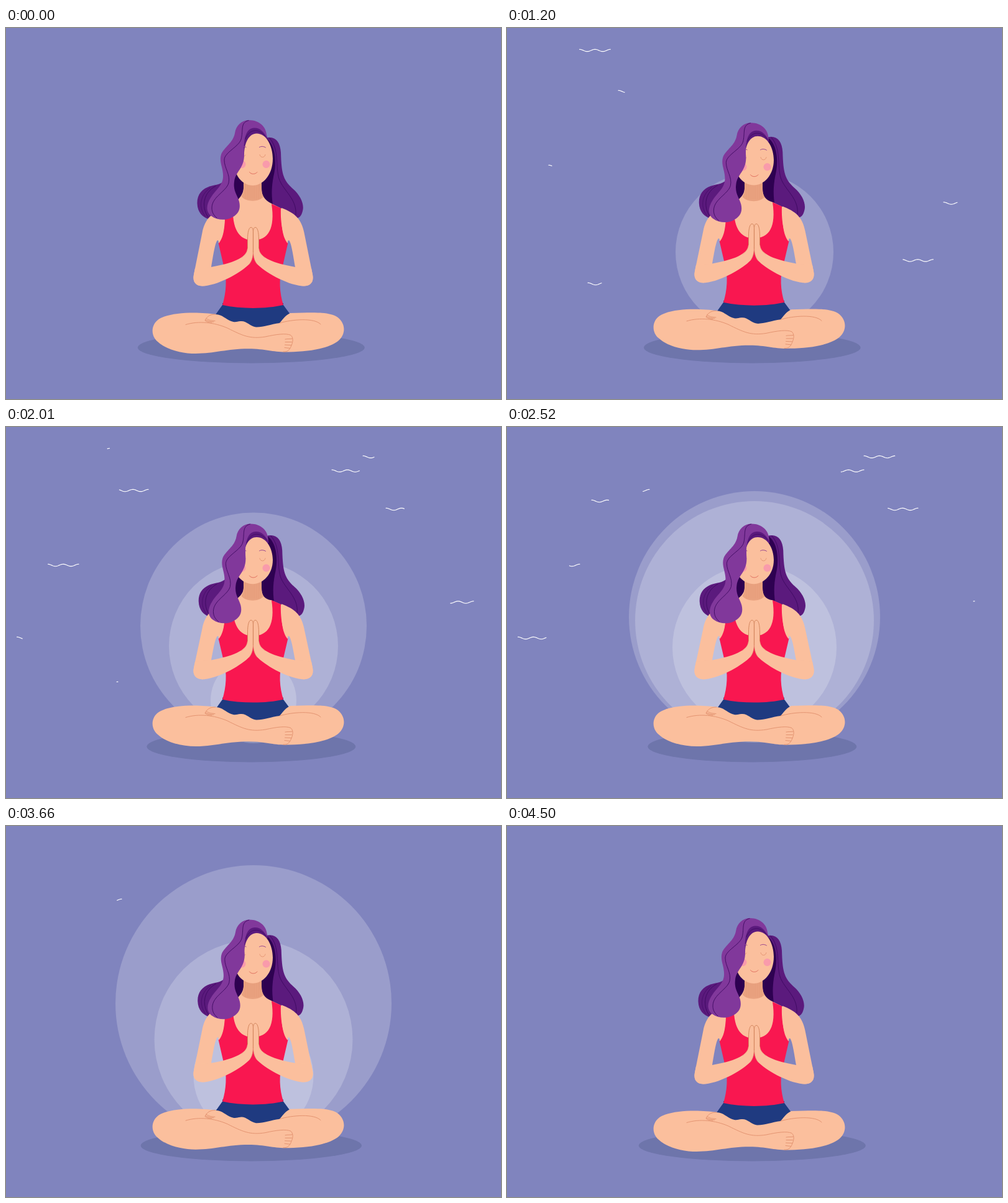
An HTML page that plays this animation: 796x596 px, repeating every 4530 ms.

```html
<!DOCTYPE html>
<html lang="en">
<head>
<meta charset="utf-8">
<title>Meditation</title>
<style>
html, body { margin: 0; width: 100%; height: 100%; overflow: hidden; background: #8084be; }
svg { display: block; width: 100vw; height: 100vh; }
</style>
</head>
<body>
<svg id="stage" viewBox="0 0 796 596" preserveAspectRatio="none"></svg>
<script>
const LOOP = 4530;
const SKIN = '#fbbf9d', LINE = '#e08f6c', RED = '#f91750', NAVY = '#1f3a80';
const LIGHT = '#81389b', MID = '#5b1a7d', DARK = '#2e0151', INK = '#3d0a60';
const stage = document.getElementById('stage');

function add(tag, attrs) {
  const el = document.createElementNS('http://www.w3.org/2000/svg', tag);
  for (const k in attrs) el.setAttribute(k, attrs[k]);
  return stage.appendChild(el);
}

// Piecewise linear lookup in [[x, y], ...]
function lerp(pts, x) {
  if (x <= pts[0][0]) return pts[0][1];
  for (let i = 1; i < pts.length; i++) {
    const [a, u] = pts[i - 1], [b, v] = pts[i];
    if (x <= b) return u + (v - u) * (x - a) / (b - a);
  }
  return pts[pts.length - 1][1];
}

// Monotone cubic over rows of keys: row[0] is time, row[k] the value; zero outside
function curve(keys, k, t) {
  const n = keys.length - 1;
  if (t <= keys[0][0] || t >= keys[n][0]) return 0;
  const slope = i => (keys[i + 1][k] - keys[i][k]) / (keys[i + 1][0] - keys[i][0]);
  const tangent = i => {
    if (i === 0) return slope(0);
    if (i === n) return 0;
    const a = slope(i - 1), b = slope(i);
    return a * b <= 0 ? 0 : 2 * a * b / (a + b);
  };
  let i = 0;
  while (t > keys[i + 1][0]) i++;
  const h = keys[i + 1][0] - keys[i][0], u = (t - keys[i][0]) / h;
  const e = u * u * (3 - 2 * u);
  return keys[i][k] + (keys[i + 1][k] - keys[i][k]) * e
    + h * u * (1 - u) * (tangent(i) * (1 - u) - tangent(i + 1) * u);
}

const smooth = x => { x = Math.max(0, Math.min(1, x)); return x * x * (3 - 2 * x); };

// Offsets [dx, dy] at the top of the breath
const still = (dx, dy) => () => [dx, dy];
const byHeight = pts => y => [0, lerp(pts, y)];
const legs = still(0, -10.3);
const torso = byHeight([[276, 1], [283, -4.8], [345, -5.6], [445, -7.6]]);
const upperArm = byHeight([[289, -4.8], [345, -5.4], [384, -9.5], [414, -9.5]]);
const foreArm = byHeight([[355, -10.3], [414, -9.5]]);
const backHair = still(2.3, -1.8);
const frontHair = still(2.5, 7.7);
const face = byHeight([[168, 8], [253, -0.8]]);
const features = still(0, 7.7);
const neck = still(0, 1);

const parts = [];
function shape(d, fill, move, mirror) {
  parts.push({ el: add('path', { fill }), d, move, mirror });
}
function line(d, stroke, move, width = 0.9, mirror) {
  parts.push({
    el: add('path', { fill: 'none', stroke, 'stroke-width': width, 'stroke-linecap': 'round', 'stroke-linejoin': 'round' }),
    d, move, mirror
  });
}
function pose({ el, d, move, mirror }, p) {
  el.setAttribute('d', d.replace(/([\d.]+),([\d.]+)/g, (m, x, y) => {
    const [dx, dy] = move(+y);
    const px = +x + dx * p, py = +y + dy * p;
    return (mirror ? 795 - px : px).toFixed(2) + ',' + py.toFixed(2);
  }));
}

const shadow = add('ellipse', { cx: 394.3, cy: 513.4, ry: 25, fill: '#6e75ab' });

// Halos: time, radius, centre height
const halos = [
  [[500, 0, 532], [850, 68, 440], [1200, 127, 360], [2010, 182, 319.5], [2520, 202, 305],
    [3000, 228, 280], [3220, 230.5, 277], [3660, 222, 285], [3780, 214, 293], [4320, 0, 508]],
  [[1280, 0, 532], [1640, 72, 435], [2010, 136, 352], [2520, 192, 311], [2680, 195, 308],
    [3000, 187.5, 314], [3660, 159.5, 343], [4250, 0, 508]],
  [[1650, 0, 532], [2010, 69, 439], [2520, 132, 354], [2640, 133, 353], [3000, 124, 363],
    [3660, 96.5, 402], [4150, 0, 508]]
].map(keys => ({ keys, el: add('circle', { cx: 398, fill: '#fff', 'fill-opacity': 0.2 }) }));

// Hair behind the body
shape('M356,238 C351,250 342,251 331,253.500 C316,257 307,267 307.500,282 C308,296 316,304 326,307 L350,302 Z', MID, backHair);
line('M337,254 C318,264 313,286 325,304', INK, backHair);
line('M328,257 C312,268 309,288 320,302', INK, backHair, 0.6);
shape('M416,177 C432,172 441,182 442,200 C443,235 446,244 461,258 C474,269 480,284 477,294 C475,302 472,306 464,306 L425,300 L412,270 Z', MID, backHair);
line('M424,177 C440,195 433,222 439,242 C446,262 468,274 466,300', INK, backHair);
shape('M416,176 C430,183 436,206 431.500,232 C427,252 426,268 430,290 L405,285 L405,200 Z', DARK, backHair);
shape('M364,232 L386,232 L386,278 L366,284 Z', DARK, backHair);

// Torso
shape('M382,240 L382,258 C381,272 366,285 345,293 L348,345 L447,345 L447,292 L427,282 C415,276 411,268 411,258 L411,240 Z', SKIN, torso);
shape('M382,240 L382,256 C382,264 380,268 378.500,270.500 C386,280 407,280 414,271 C411.500,267 411,262 411,256 L411,240 Z', '#e9a280', neck);
for (let x = 385; x < 410; x += 3) line(`M${x},250 L${x},274`, '#e2946f', neck, 0.4);

shape('M348,442 L446,442 L446,445 L460,464 L440,484 L390,490 L333,466 L348,445 Z', NAVY, torso);
shape('M352,290 C352,325 348,339 341.500,345 L350,382 C356,402 354,426 348,445 C380,452 420,451 446,445 C440,426 438,402 445,382 L453.500,345 C446,337 441,315 442,289.500 L427,282.500 C433,322 422,341 397,341 C375,341 363,323 365,285 Z', RED, torso);

// Legs
shape('M337,460 C312,456 260,455 243,470 C233,479 233,495 244,504 C258,517 284,523 305,523 C335,523 355,515.300 390,515.300 C420,515.500 430,521.500 455,520.500 C490,520 521,514 535,502 C547,491 546,474 533,464.500 C519,455.500 495,457 457,458 C447,463 444,470 440,474 C425,476 413,481 402,480.500 C392,479 387,470 377,471 C371,471.500 369,473.500 362,471 C352,467 349,461 337,460 Z', SKIN, legs);
line('M289,476.500 C310,470 335,473 356,482 C380,494 392,500 417,496 C435,492 450,490 458,493.500 C463,498 461,506 458.500,511 C456,518 452,520.500 446,520', LINE, legs);
line('M449,500 C453,499 457,500 460.500,499 M449,504.500 L459.500,504.500 M448.500,509 L458.500,509.500 M448,513.500 L456.500,514.500', LINE, legs);
line('M337,460 C329,459.500 323,463 320,470 C324,473 328,473 331,473 M322,466.500 C326,470 331,470 336,470.500 M321,469 C325,471.500 329,471.500 334,472', LINE, legs);
line('M440,474 C460,468 496,465 506,476', LINE, legs);

// Arms
for (const mirror of [false, true]) {
  shape('M352,289 C331,297 320,306 315.500,329 L302,396 C299,410 308,416 320,414 L330,386 L330,384 C333,367 336,345 340,341 C342,341 342,344 342,346 C349,338 353,322 352,289 Z', SKIN, upperArm, mirror);
  shape('M302,396 C299.500,409 306,415.500 319,414.500 C346,411.500 380,391 391.500,379 C396,373 397.500,367 397.500,355 L397.500,328 C397.500,322 396,320 394,320 C390,320 388,328 388,340 L388,355 C387,369 364,378 330,384 L304,386 Z', SKIN, foreArm, mirror);
  line('M388.500,354 L388.500,340 C388.500,328 390.500,320.300 394,320.300 C396.500,320.300 397.400,323 397.400,328 L397.400,360', '#cf8058', foreArm, 0.9, mirror);
  line('M388.500,354 C388,361 384,365 379,369', LINE, foreArm, 0.5, mirror);
  line('M397.400,356 C397.500,367 396,373 391.500,379', LINE, foreArm, 0.7, mirror);
}

// Head
shape('M382,204 C378,172 387,156 403,158 C413,159 420,168 420,178 L405,190 Z', MID, frontHair);
line('M385,178 C392,160 408,162 417,174', INK, frontHair, 0.8);
shape('M403,169.500 C419,169.500 429,190 429,210 C429,236 413,253 397,253 C381,253 366,238 367,213 L383,204 C383,184 391,169.500 403,169.500 Z', SKIN, face);
const disc = (x, y, r) => {
  const k = r * 0.55;
  return `M${x - r},${y} C${x - r},${y - k} ${x - k},${y - r} ${x},${y - r} C${x + k},${y - r} ${x + r},${y - k} ${x + r},${y}`
    + ` C${x + r},${y + k} ${x + k},${y + r} ${x},${y + r} C${x - k},${y + r} ${x - r},${y + k} ${x - r},${y} Z`;
};
shape(disc(418.5, 219, 6), '#f99bab', features);
shape(disc(379.5, 219, 6), '#f99bab', features);
line('M407.500,191.500 C410,189.800 414,189.800 417.500,192 M380,190 C382,190 384,190.500 386,191.500', '#96418f', features, 1);
line('M408,203.500 C409,209 416,209 417,203.500 M380,207 C382,207 384,206 385,204', LINE, features, 0.8);
line('M391.500,231.500 C394,235.500 401,235.500 404,231.500', '#e0705f', features, 1);

shape('M419,175 C420,160 408,148 391,148 C379,148 370,156 368,169 C365,185 351,191 346,203 C342,216 350,225 349,240 C348,254 336,261 329,273 C322,284 321,295 330,302 C340,309 352,309 361,305.500 C373,300 378,292 375,279 C372,268 365,262 367,247 C369,230 383,226 383,204 C381,178 386,161 399,160.500 C409,160 415,168 419,175 Z', LIGHT, frontHair);
line('M390,148.500 C376,152 382,165 378,179 C374,191 351,200 351,212 C351,225 361,235 358,249 C354,263 331,271 331,289 C331,296 334,301 339,305', INK, frontHair);

// Wisps: left end, height, start, time to erase
const GROW = 930;
const wisps = [
  [116.5, 36, 297], [179, 102, 933], [67, 222, 1018], [702, 281.5, 772],
  [635.5, 373.5, 180], [130, 411, 772, 350], [524, 70.5, 1275], [574, 48, 1633],
  [611, 132, 1490], [17.5, 339, 1762], [136, 119, 2024]
].map(([x, y, start, erase = GROW]) => ({
  x, y, start, erase,
  el: add('path', { fill: 'none', stroke: '#fff', 'stroke-width': 1.15, 'stroke-linecap': 'round', 'stroke-linejoin': 'round' })
}));

function drawWisp(w, t) {
  const to = 50 * smooth((t - w.start) / GROW);
  const from = 50 * smooth((t - w.start - GROW) / w.erase);
  let d = '';
  if (to - from > 0.3) {
    const n = Math.ceil(to - from);
    for (let i = 0; i <= n; i++) {
      const x = from + (to - from) * i / n;
      const y = w.y - 1.7 * Math.cos(x / 25 * 2 * Math.PI);
      d += (i ? 'L' : 'M') + (w.x + x).toFixed(2) + ' ' + y.toFixed(2);
    }
  }
  w.el.setAttribute('d', d);
}

function draw(t) {
  const p = (1 - Math.cos(2 * Math.PI * t / LOOP)) / 2;
  shadow.setAttribute('rx', 182.5 - 15 * p);
  for (const { el, keys } of halos) {
    el.setAttribute('r', Math.max(0, curve(keys, 1, t)));
    el.setAttribute('cy', curve(keys, 2, t));
  }
  parts.forEach(part => pose(part, p));
  wisps.forEach(w => drawWisp(w, t));
}

let begin;
function tick(now) {
  if (begin === undefined) begin = now;
  draw((now - begin) % LOOP);
  requestAnimationFrame(tick);
}
draw(0);
requestAnimationFrame(tick);
</script>
</body>
</html>
```
